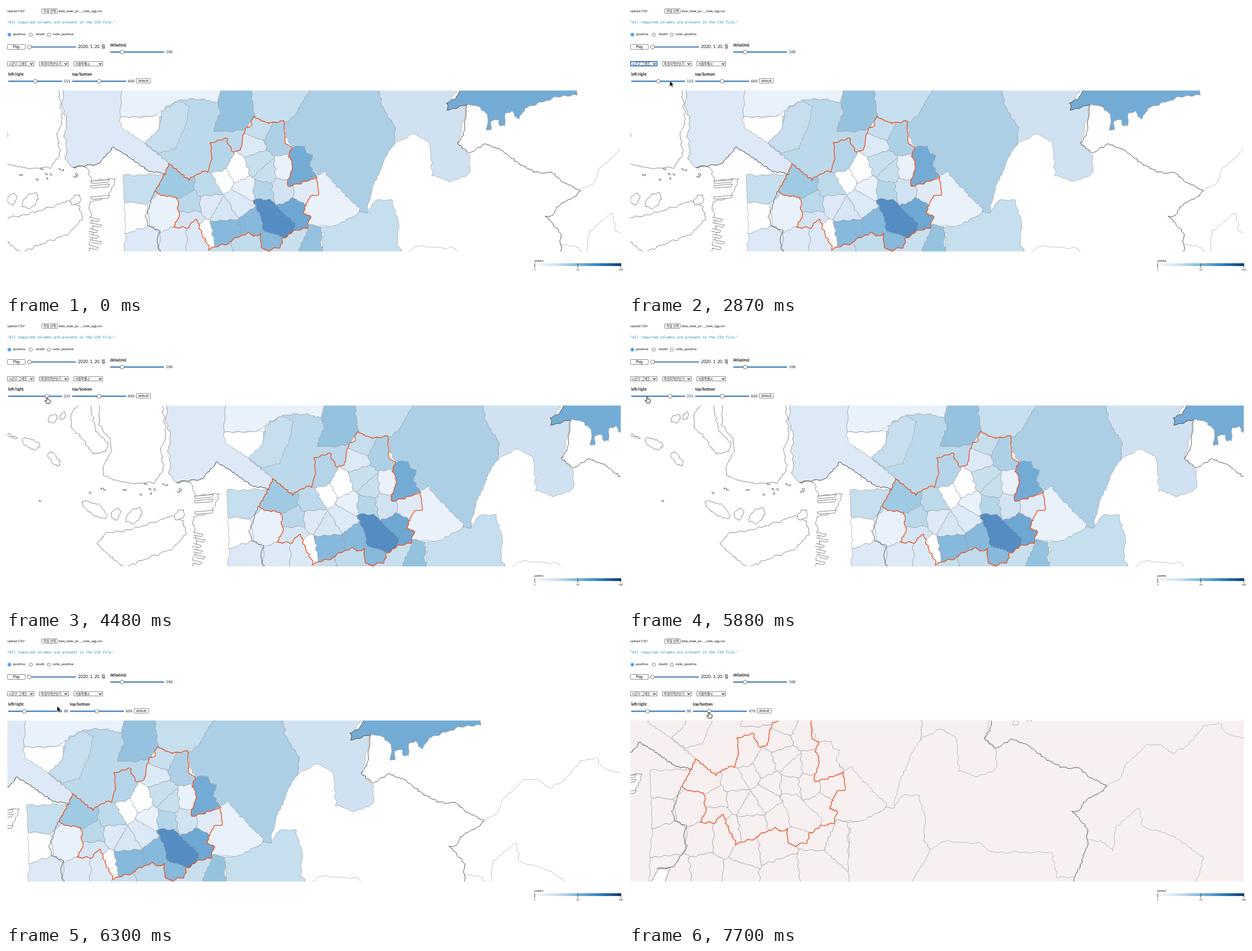
Animation, 1095 px wide and 511 px high, one loop 8 s. Source, as an HTML page:

```html
<!DOCTYPE html>
<html lang="ko">
<head>
<meta charset="utf-8">
<title>Regional map controls</title>
<style>
html, body { margin: 0; width: 100%; height: 100%; overflow: hidden; background: #fff; }
svg { display: block; width: 100vw; height: 100vh; }
text { font: 5.6px Arial, "Liberation Sans", "Noto Sans CJK KR", "Noto Sans CJK", sans-serif; fill: #111; }
.lato { font: 6.3px Lato, "Noto Sans CJK KR", "Noto Sans CJK", sans-serif; }
.date { font-size: 7.5px; }
.bold { font-size: 6.8px; font-weight: 700; }
.mono { font: 6.5px "DejaVu Sans Mono", monospace; fill: #333; }
.key { font-size: 4.6px; }
.box { fill: #fff; stroke: #666; stroke-width: .8; }
.track { stroke: #4a86c0; stroke-width: 2.4; stroke-linecap: round; }
.knob { fill: #fff; stroke: #555; stroke-width: .8; }
.chevron { fill: none; stroke: #111; stroke-width: 1.2; }
#map path { stroke-linejoin: round; }
.land { fill: #fff; stroke: #666; stroke-width: .8; }
.region { stroke: #979da3; stroke-width: .7; }
.line { fill: none; stroke: #a5a5a5; stroke-width: .7; }
.province { fill: none; stroke: #505050; stroke-width: 1; }
.city { fill: none; stroke: #ea5220; stroke-width: 1.4; }
#map.plain .land, #map.plain .region { fill: #f7eff0; }
#map .water { fill: #fff; stroke: #666; stroke-width: .8; }
</style>
</head>
<body>
<svg viewBox="0 0 1095 511" preserveAspectRatio="none">
<defs>
  <clipPath id="frame"><rect x="2.5" y="150.5" width="1088.5" height="286.5"/></clipPath>
  <clipPath id="cityClip"><path id="cityShape"/></clipPath>
  <linearGradient id="blues">
    <stop offset="0" stop-color="#f7fbff"/><stop offset=".25" stop-color="#cfe1f2"/>
    <stop offset=".5" stop-color="#7db6db"/><stop offset=".75" stop-color="#3181bd"/>
    <stop offset="1" stop-color="#0d3b78"/>
  </linearGradient>
</defs>

<text x="2.3" y="11" style="font-size:5.8px">upload CSV</text>
<rect class="box" x="63.5" y="5" width="27.5" height="8.2" rx=".8"/>
<text x="66.5" y="11.2">파일 선택</text>
<text x="93.2" y="11">data_state_po..._code_sgg.csv</text>
<text class="mono" x="2" y="31.2" style="font-size:6.28px;fill:#1086b4">"All required columns are present in the CSV file."</text>

<circle cx="6" cy="51" r="2.9" fill="#fff" stroke="#0b74e5" stroke-width=".8"/><circle cx="6" cy="51" r="1.7" fill="#0b74e5"/>
<circle class="box" cx="44" cy="51" r="2.9"/><circle class="box" cx="76" cy="51" r="2.9"/>
<text class="lato" x="12.5" y="52.3">positive</text>
<text class="lato" x="53" y="52.3">death</text>
<text class="lato" x="82.8" y="52.3">ratio_positive</text>

<rect class="box" x="2.7" y="68.5" width="31.5" height="8.8" rx=".8"/>
<text x="18.3" y="75.1" text-anchor="middle" style="font-size:6.3px">Play</text>
<path class="track" d="M39 73H123.5" style="stroke:#4f7fb2;stroke-width:2"/>
<circle class="knob" cx="41.7" cy="73" r="3.5"/>
<text class="lato date" x="127.8" y="75">2020. 1. 20. 월</text>
<text class="lato bold" x="185" y="72.3">delay(ms)</text>
<path class="track" d="M186 82H279.5"/>
<circle class="knob" cx="206.2" cy="82" r="3.5"/>
<text class="mono" x="284" y="84.2">200</text>

<rect class="box" x="2.7" y="99" width="47" height="7.8"/>
<rect class="box" x="59.6" y="99" width="51" height="7.8"/>
<rect class="box" x="120.6" y="99" width="51" height="7.8"/>
<text x="5" y="105.1">시군구 그래프</text>
<text x="62" y="105.1">특정지역안보기</text>
<text x="123" y="105.1">서울특별시</text>
<path class="chevron" d="M42.8 101.8l2.3 2.3 2.3-2.3M103.8 101.8l2.3 2.3 2.3-2.3M164.8 101.8l2.3 2.3 2.3-2.3"/>
<rect id="focus" x="2.9" y="99.1" width="46.7" height="7.5" rx="1" fill="none" stroke="#1667c4" stroke-width="1.5"/>

<text class="lato bold" x="4" y="124.3">left/right</text>
<path class="track" d="M5 134H98.7"/>
<circle id="knobX" class="knob" cy="134" r="3.5"/>
<text id="valueX" class="mono" x="102.4" y="136.2"></text>
<g id="vertical">
  <text class="lato bold" x="117.4" y="124.3">top/bottom</text>
  <path class="track" d="M118.5 134H212.3"/>
  <circle id="knobY" class="knob" cy="134" r="3.5"/>
  <text id="valueY" class="mono" x="216.4" y="136.2"></text>
  <rect class="box" x="231.2" y="129.2" width="25.2" height="8" rx=".8"/>
  <text x="243.8" y="135.3" text-anchor="middle" style="font-size:6.2px">default</text>
</g>

<g clip-path="url(#frame)">
  <g id="map">
    <g id="ground"></g>
    <g id="districts" clip-path="url(#cityClip)"></g>
    <g id="borders"></g>
  </g>
</g>

<text class="lato" x="938" y="454.8" style="font-size:4.5px;font-weight:700">positive</text>
<rect x="938" y="458" width="153.5" height="5" fill="url(#blues)"/>
<path d="M938.4 458v8.5M1014.7 458v8.5M1091.2 458v8.5" stroke="#222" stroke-width=".8"/>
<g text-anchor="middle">
  <text class="lato key" x="938.5" y="471">1</text><text class="lato key" x="1014.7" y="471">10</text>
  <text class="lato key" x="1091" y="471">100</text>
</g>

<circle id="ripple" r="20" fill="#777" fill-opacity=".2"/>
<g id="cursor" stroke-linejoin="round">
  <path id="arrow" d="M0 0V10.4L2.4 8.2 4 11.7 5.7 10.9 4.1 7.5H7.2Z" fill="#000" stroke="#fff" stroke-width=".6"/>
  <path id="hand" d="M-1 1Q0-.6 1 1V4.3Q2 3.5 2.6 4.6 3.7 4 4.2 5.1 5.6 4.8 5.6 6.2V8L4.6 11H-1.2L-3.8 7.3Q-4.2 5.7-2.7 6L-1 7.3Z" fill="#fff" stroke="#000" stroke-width=".9"/>
</g>
</svg>

<script>
const $ = id => document.getElementById(id);
const parse = text => text.split(' ').map(pair => pair.split(',').map(Number));

// A position-based warp, so that neighbours share the same ragged border.
const warp = ([x, y]) => [
  x + Math.sin(x * .4 + y * .3) + .9 * Math.sin(x * 1.9 + y * 2.7),
  y + Math.sin(x * .3 - y * .45) + .9 * Math.sin(x * 2.3 - y * 1.7)
].map(v => v.toFixed(1));

function rough(points, closed) {
  const ring = closed ? [...points, points[0]] : points;
  const out = [warp(ring[0])];
  for (let i = 1; i < ring.length; i++) {
    const [ax, ay] = ring[i - 1], [bx, by] = ring[i];
    const n = Math.ceil(Math.hypot(bx - ax, by - ay) / 2.6);
    for (let k = 1; k <= n; k++) out.push(warp([ax + (bx - ax) * k / n, ay + (by - ay) * k / n]));
  }
  return 'M' + out.join('L') + (closed ? 'Z' : '');
}
function add(layer, cls, d, fill = '') {
  const path = document.createElementNS('http://www.w3.org/2000/svg', 'path');
  path.setAttribute('class', cls);
  path.setAttribute('d', d);
  if (fill) path.setAttribute('fill', fill);
  $(layer).append(path);
}
const land = text => add('ground', 'land', rough(parse(text), true));
const region = (fill, text) => add('ground', 'region', rough(parse(text), true), fill);
const border = (cls, text) => add('borders', cls, rough(parse(text)));

// Keeps the part of a polygon that lies nearer to site a than to site b.
function nearer(poly, a, b) {
  const side = ([x, y]) => (x - b.x) ** 2 + (y - b.y) ** 2 - (x - a.x) ** 2 - (y - a.y) ** 2;
  return poly.flatMap((p, i) => {
    const q = poly[(i + 1) % poly.length], sp = side(p), sq = side(q);
    const kept = sp >= 0 ? [p] : [];
    if (sp * sq < 0) kept.push(p.map((v, j) => v + (q[j] - v) * sp / (sp - sq)));
    return kept;
  });
}
function cells(layer, bounds, text) {
  const sites = text.trim().split(/\s+/).map(s => s.split(','))
    .map(([x, y, fill]) => ({ x: +x, y: +y, fill: '#' + fill }));
  for (const site of sites) {
    const poly = sites.filter(s => s !== site).reduce((p, other) => nearer(p, site, other), parse(bounds));
    add(layer, 'region', rough(poly, true), site.fill);
  }
}
function island(x, y, rx, ry, tilt) {
  const ring = Array.from({ length: 9 }, (_, i) => {
    const a = i * Math.PI * 2 / 9, r = 1 + .25 * Math.sin(i * 5 + x);
    const u = rx * r * Math.cos(a), v = ry * r * Math.sin(a);
    return [x + u * Math.cos(tilt) - v * Math.sin(tilt), y + u * Math.sin(tilt) + v * Math.cos(tilt)];
  });
  add('ground', 'land', rough(ring, true));
}

// Mainland, large islands, small islands and rocks
land('104,140 100,180 109,205 104,228 108,250 106,272 118,287 144,286 152,311 194,306 182,340 148,348 150,375 156,400 146,437 150,510 1275,510 1275,140');
land('-18,140 -20,185 0,208 3,230 -10,255 -12,275 30,289 80,288 96,265 91,230 100,200 92,140');
land('-50,140 -68,165 -68,190 -44,215 -30,238 -6,232 -4,215 -24,198 -36,145');
land('-22,397 -8,379 40,370 84,357 110,346 131,358 136,380 110,406 60,425 25,440');
island(-102, 173, 10, 6, -.1);
island(-83, 168, 5, 6, 0);
island(-175, 205, 8, 3, .3);
island(-140, 218, 21, 7, .5);
island(-99, 245, 13, 8, .8);
island(-28, 335, 27, 9, .4);
island(11, 344, 9, 8, .2);
island(44, 346, 15, 12, -.4);
island(124, 345, 13, 6, -.6);
let seed = 7;
const random = () => (seed = seed * 16807 % 2147483647) / 2147483647;
for (let i = 0; i < 16; i++) {
  const x = -125 + random() * 270;
  island(x, 292 + random() * 22 - x * .06, 1 + random() * 2, 1, random());
}

// Outer regions
region('#e9f1fb', '207,140 384,140 376,172 345,166 305,168 262,195 201,199');
region('#dde9f6', '104,140 207,140 201,199 246,243 290,282 284,300 253,293 210,262 190,251 165,281 118,287 106,272 108,250 104,228 109,205 100,180');
region('#bcd8eb', '246,243 285,180 305,168 345,166 376,172 380,190 368,223 395,223 424,219 416,257 380,300 326,310 290,282');
region('#c6deed', '246,243 270,222 278,188 305,168 326,180 318,215 300,255 272,262');
region('#fff', '201,199 250,197 274,196 270,222 246,243 205,216');
region('#c5dfee', '433,140 549,140 532,163 513,195 493,210 441,205');
region('#95c3df', '384,140 433,140 441,198 424,219 395,223 368,223 380,190 376,172');
region('#c5dfee', '627,368 640,367 655,346 684,345 698,388 694,425 706,442 671,505 558,505 563,405 552,396 598,385');
cells('ground', '208,301 285,300 560,394 560,505 206,505 212,400', `
  235,325,c5dfee 230,377,ffffff 276,370,e9f1fb 243,418,dde9f6 301,423,dfeaf7 340,424,dce9f6 380,445,c6deed
  425,440,c0dbec 508,413,c8dfee 545,428,95c3df 250,485,ffffff 310,478,ffffff 365,487,ffffff 440,482,ffffff 505,475,ffffff`);
region('#adcfe6', '549,140 660,140 668,180 690,215 690,245 671,275 650,325 640,367 627,368 605,340 552,300 500,240 493,210 513,195 532,163');
region('#e9f1fb', '551,304 565,296 580,312 605,340 627,358 627,368 598,385 580,392 537,390 520,350');
region('#74abd5', '500,252 531,249 533,262 543,266 540,285 552,303 525,316 500,325');
region('#d0e2f2', '660,140 808,140 782,175 818,176 802,246 823,265 822,300 790,312 757,302 752,243 725,227 690,245 690,215 668,180');
region('#74abd5', '808,140 1014,140 1013,158 975,163 925,180 908,200 898,186 885,192 886,214 877,214 873,202 862,205 861,220 852,220 856,195 838,178 818,176 784,185 782,173 803,160');

// City districts: one centre and shade each
const city = parse('265,328 290,282 326,310 347,294 359,296 365,268 363,245 390,235 403,261 416,257 424,219 436,213 435,203 441,198 466,208 493,204 496,244 507,250 502,268 509,281 499,322 525,316 551,304 555,335 540,338 526,370 540,375 535,396 513,400 491,413 487,429 465,436 453,430 451,405 440,411 430,403 411,412 390,424 361,432 346,402 338,379 320,395 299,394 307,374 304,342 271,335');
const cityOutline = rough(city, true);
$('cityShape').setAttribute('d', cityOutline);
cells('districts', '255,190 565,190 565,445 255,445', `
  307,320,9fcae3 325,355,bad8ea 325,378,d5e5f3 365,352,dde9f6 362,320,bdd9ec 377,278,b4d4e9 384,308,ffffff
  410,293,ffffff 437,245,dce9f6 447,222,c6deee 482,236,aed0e7 447,281,c8dfee 493,295,e9f1fb 463,298,c8dfee
  424,327,e9f1fb 457,328,b5d6e9 488,322,d1e3f3 412,348,dce9f6 385,364,d6e6f4 388,400,86b9dc 345,408,ffffff
  442,388,86b9dc 472,417,86b9dc 512,372,6ea7d2 533,325,e0ebf7`);
add('districts', 'region', rough(parse('438,345 468,344 487,362 513,388 511,410 492,412 457,400 453,378'), true), '#548cc3');

// Harbour piers and the southern inlet
for (let i = 0; i < 6; i++)
  add('ground', 'water', `M148 ${376 + i * 10}l${18 + 4 * Math.sin(i * 2)} 4-3 4-14-3`);
for (const y of [312, 320, 340]) add('ground', 'water', `M150 ${y}l34-3-3 5-29 2Z`);
add('ground', 'water', 'M209 502l15-27 20-1-10 28Z');

border('line', '1019,328 1041,318 1053,290 1091,255 1113,256 1136,272 1161,257 1191,222 1219,217 1231,235 1266,246');
border('line', '985,425 1009,427 1031,444 1034,402 1076,368 1083,402 1136,417 1161,434 1191,457 1176,505');
border('line', '694,425 706,442 731,427 796,432 811,447 921,447 931,492 961,490');
border('province', '118,287 165,281 190,251 210,262 253,293 284,300');
border('province', '265,328 248,372 250,388 273,400 268,420 273,437 249,474 222,476');
border('province', '808,140 803,160 782,173 784,185 818,176 813,228 802,246 822,262 852,245 878,256 910,280 940,297 970,296 985,313 1019,328 1013,337 977,357 972,372 957,374 985,404 984,437 958,505');
add('borders', 'city', cityOutline);

const LOOP = 8000, STEP = 70;
// Each move: start time, end time, place reached.
const moves = [
  [1400, 1750, 39, 112], [1890, 2660, 72.5, 133], [2730, 2800, 79, 137], [2800, 2870, 72.3, 133],
  [3220, 3290, 73, 135.6], [4760, 5530, 32.5, 134.8], [6000, 6440, 118, 120],
  [6440, 6650, 148, 127], [6650, 6860, 140, 135], [7070, 7140, 142, 135.3]
];
const within = (t, ranges) => ranges.some(([from, to]) => t >= from && t < to);
const show = (id, on) => $(id).setAttribute('visibility', on ? 'visible' : 'hidden');

function cursorAt(t) {
  return moves.reduce(([x, y], [from, to, toX, toY]) => {
    const k = Math.min(1, Math.max(0, (t - from) / (to - from)));
    return [x + (toX - x) * k, y + (toY - y) * k];
  }, [-18.5, 79.5]);
}

function render(t) {
  const lr = t < 3850 ? 155 : t < 5950 ? 225 : 90;
  const tb = t < 7560 ? 600 : 470;
  $('map').setAttribute('transform', `translate(${(lr - 155) * 2.63} ${(tb - 600) * 0.477})`);
  $('map').classList.toggle('plain', within(t, [[3850, 4340], [5950, 6230], [7560, LOOP]]));
  $('knobX').setAttribute('cx', 52 + (lr - 155) * 0.298);
  $('knobY').setAttribute('cx', 165.4 + (tb - 600) * 0.146);
  $('valueX').textContent = lr;
  $('valueY').textContent = tb;
  $('vertical').setAttribute('transform', `translate(${lr < 100 ? -4 : 0} 0)`);

  const [x, y] = cursorAt(t);
  const hand = within(t, [[3290, 6020], [7140, LOOP]]);
  $('cursor').setAttribute('transform', `translate(${x} ${y})`);
  show('hand', hand);
  show('arrow', !hand);
  $('ripple').setAttribute('cx', x);
  $('ripple').setAttribute('cy', y);
  show('ripple', within(t, [[3570, 3710], [5530, 5670], [7280, 7350]]));
  show('focus', within(t, [[2870, 3850]]));
}

const start = performance.now();
let shown = -1;
function tick() {
  const t = Math.floor((performance.now() - start) % LOOP / STEP) * STEP;
  if (t !== shown) render(shown = t);
  requestAnimationFrame(tick);
}
tick();
</script>
</body>
</html>
```
